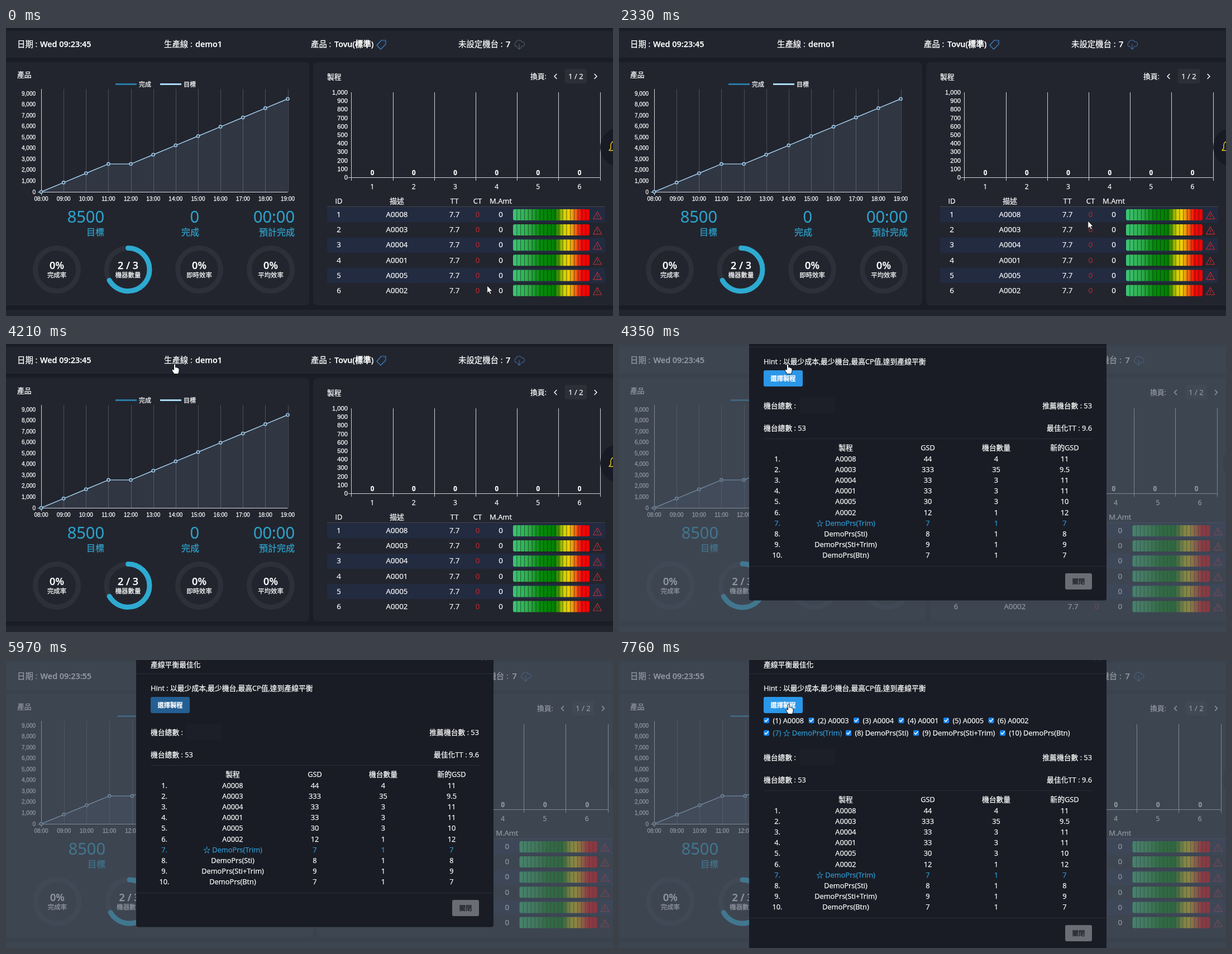
Animation, 1087 px wide and 515 px high, one loop 7990 ms. Source, as an HTML page with a canvas:

```html
<!DOCTYPE html>
<html lang="zh-Hant">
<head>
<meta charset="utf-8">
<title>Production dashboard</title>
<style>
html, body { margin: 0; width: 100%; height: 100%; overflow: hidden; background: #1a1d26; }
canvas { display: block; }
</style>
</head>
<body>
<canvas id="stage" width="1087" height="515"></canvas>
<script>
const ctx = document.getElementById('stage').getContext('2d');
const LOOP = 7990;
const UI = '"Open Sans", "Noto Sans CJK TC", "Noto Sans CJK", "Noto Sans CJK JP", sans-serif';
const ARIAL = '"Liberation Sans", sans-serif';
const BLUE = '#2fa3cc';

// Moments, in ms
const OPEN = 4350, OPENED = 4590, CLOCK = 4980, RESIZE = 5970, EXPAND = 7570, EXPANDED = 7760;

// Pointer route: time, x, y
const ROUTE = [
  [0, 862, 461], [70, 840, 455], [160, 790, 441], [240, 762, 430], [330, 762, 430],
  [700, 749, 390], [1180, 800, 319], [1400, 789, 306], [1700, 820, 291], [2020, 850, 308],
  [2330, 840, 345], [2600, 800, 440], [2750, 764, 470], [2900, 775, 466], [3200, 560, 250],
  [3400, 310, 50], [3510, 302, 32], [3780, 302, 32], [3910, 302, 36], [4590, 302, 36],
  [4900, 301, 39], [5080, 300, 42], [5300, 296, 76], [5550, 290, 60], [5830, 277, 2],
  [5970, 273, -14], [6400, 275, -14], [6750, 290, 40], [7050, 300, 70], [7300, 304, 79], [LOOP, 304, 79]
];

const clamp = v => Math.max(0, Math.min(1, v));
const easeOut = p => 1 - (1 - clamp(p)) ** 2;
let wide = false;
const fit = x => wide ? x + (x - 20) * 0.013 : x;

function text(str, x, cy, size = 13, color = '#fff', align = 'left', weight = 400, family = UI) {
  ctx.font = `${weight} ${size}px ${family}`;
  ctx.textAlign = align;
  ctx.fillStyle = ctx.strokeStyle = color;
  ctx.lineWidth = 0.25;
  ctx.fillText(str, x, cy + size * 0.36);
  ctx.strokeText(str, x, cy + size * 0.36);
}

function box(x, y, w, h, color, r = 0) {
  ctx.fillStyle = color;
  ctx.beginPath();
  ctx.roundRect(x, y, w, h, r);
  ctx.fill();
}

const hLine = (x1, x2, y, color) => box(x1, Math.round(y), x2 - x1, 1, color);
const vLine = (x, y1, y2, color) => box(Math.round(x), y1, 1, y2 - y1, color);

function stroke(path, x, y, color, width = 1.2, fill) {
  ctx.save();
  ctx.translate(x, y);
  ctx.lineWidth = width;
  ctx.lineJoin = ctx.lineCap = 'round';
  ctx.strokeStyle = color;
  const shape = new Path2D(path);
  if (fill) { ctx.fillStyle = fill; ctx.fill(shape); }
  ctx.stroke(shape);
  ctx.restore();
}

function header(t) {
  box(0, 5, 1087, 48, '#22252e');
  const item = (x, label, valueX, value) => {
    text(label, fit(x), 29, 14.4);
    text(value, fit(valueX), 29, 14.4, '#fff', 'left', 600);
  };
  item(20, '日期 :', 61, 'Wed 09:23:' + (t < CLOCK ? 45 : 55));
  item(283, '生產線 :', 339, 'demo1');
  item(546, '產品 :', 588, 'Tovu(標準)');
  item(810, '未設定機台 :', 895, '7');
  stroke('M1 10 L9 1 L17 1 L17 8 L8 17 Z M14 4 h.5', fit(663), 21, '#3d86cf');
  const cloud = t < 70 ? '#4a5966' : t > OPENED && t < RESIZE ? '#3f97c9' : '#41628f';
  stroke('M6 12 H4 A4 4 0 0 1 4 5 A6 6 0 0 1 15 4 A4 4 0 0 1 16 12 H14 M10 8 V17 M7 14 L10 17 L13 14',
    fit(909), 21, cloud, 1.3);
}

function targetChart(t) {
  const step = t < RESIZE ? 40.14 : 40.7, left = 63, base = 293;
  const shift = wide ? 3.5 : 0;
  box(196 + shift, 99, 38, 3, '#2a7ba6');
  text('完成', 238 + shift, 101, 11);
  box(276 + shift, 99, 38, 3, '#a9d9f7');
  text('目標', 318 + shift, 101, 11);

  const yOf = v => base - v * 0.01956;
  const points = Array.from({ length: 12 }, (_, i) => [left + i * step, yOf(850 * (i < 4 ? i : i - 1))]);
  for (let i = 0; i < 10; i++)
    text((i * 1000).toLocaleString('en-US'), 53, yOf(i * 1000), 10, '#fff', 'right', 400, ARIAL);
  points.forEach(([x], i) => {
    if (i) vLine(x, 109, base, '#4d5058');
    text(String(8 + i).padStart(2, '0') + ':00', x, 305, 10, '#fff', 'center', 400, ARIAL);
  });
  vLine(left, 109, 299, '#d5d8dd');
  hLine(57, left + step * 11, base, '#d5d8dd');

  ctx.beginPath();
  points.forEach(p => ctx.lineTo(...p));
  ctx.strokeStyle = '#a5d0ee';
  ctx.lineWidth = 1.4;
  ctx.stroke();
  ctx.lineTo(points[11][0], base);
  ctx.lineTo(left, base);
  ctx.fillStyle = 'rgba(165,208,238,.1)';
  ctx.fill();
  points.forEach(([x, y]) => {
    ctx.beginPath();
    ctx.arc(x, y, 2.6, 0, 7);
    ctx.fillStyle = '#34475a';
    ctx.fill();
    ctx.stroke();
  });
}

function ring(cx, value, label, share) {
  const r = wide ? 39 : 38.5, cy = 432;
  cx = fit(cx);
  ctx.lineWidth = 9;
  ctx.lineCap = 'round';
  const arc = (part, color) => {
    ctx.beginPath();
    ctx.arc(cx, cy, r, -Math.PI / 2, (part * 2 - 0.5) * Math.PI);
    ctx.strokeStyle = color;
    ctx.stroke();
  };
  arc(1, '#2d3039');
  if (share) arc(share, '#2eaad1');
  text(value, cx, 425, 18, '#fff', 'center', 600);
  text(label, cx, 442, 11.4, '#fff', 'center');
}

function productPanel(t) {
  box(-10, 61, fit(543) + 10, 435, '#22252e', 8);
  text('產品', 20, 83, 12.8);
  targetChart(t);
  [[176, '8500', '目標'], [346, '0', '完成'], [517, '00:00', '預計完成']].forEach(([x, value, label]) => {
    text(value, fit(x), 338, 29, BLUE, 'right');
    text(label, fit(x), 365, 16, BLUE, 'right');
  });
  ring(91, '0%', '完成率');
  ring(218.5, '2 / 3', '機器數量', 2 / 3);
  ring(346, '0%', '即時效率');
  ring(474, '0%', '平均效率');
}

function gauge(x, y, w) {
  const g = ctx.createLinearGradient(x, 0, x + w, 0);
  [[0, '#3cc574'], [.2, '#2fac4d'], [.36, '#068a0c'], [.55, '#008000'], [.6, '#5c9a00'], [.66, '#cfcf08'],
   [.73, '#f2d000'], [.78, '#ee9310'], [.84, '#f24a10'], [.89, '#f40808'], [1, '#f40000']]
    .forEach(s => g.addColorStop(...s));
  box(x, y, w, 20, g, 3);
  for (let i = 1; i < 20; i++) box(x + i * w / 20 - .5, y, 1, 20, 'rgba(18,28,22,.6)');
}

function processPanel(t) {
  box(fit(550), 61, 560, 435, '#22252e', 8);
  text('製程', fit(575), 87, 12.8);
  text('換頁:', fit(939), 86, 12.8);
  stroke('M4 -4 L0 0 L4 4', fit(982), 86.5, '#fff', 1.5);
  box(fit(1001), 73, 39, 26, '#2c2f38', 3);
  text('1 / 2', fit(1020.5), 86, 13, '#fff', 'center');
  stroke('M0 -4 L4 0 L0 4', fit(1054), 86.5, '#fff', 1.5);

  const left = wide ? 625.4 : 618.4, step = t < RESIZE ? 74.2 : 75.4, line = '#d0d3d8';
  for (let i = 0; i <= 10; i++) {
    const y = 267 - i * 15.2;
    text((i * 100).toLocaleString('en-US'), left - 6.5, y, 11.2, '#fff', 'right', 400, ARIAL);
  }
  hLine(left - 6, left + step * 6, 267, line);
  for (let i = 0; i <= 6; i++) {
    vLine(left + i * step, 115, 273, line);
    if (i === 6) break;
    text('0', left + (i + .5) * step + .6, 259, 11.5, '#fff', 'center', 700);
    text(i + 1, fit(656 + i * 74.2), 284, 12, '#fff', 'center');
  }

  const columns = [596, 700, 803, 844.5, 886];
  ['ID', '描述', 'TT', 'CT', 'M.Amt'].forEach((s, i) => text(s, fit(columns[i]), 309, 13, '#fff', 'center'));
  hLine(fit(575), fit(1073), 319, '#454851');
  [8, 3, 4, 1, 5, 2].forEach((code, i) => {
    const y = 333.5 + i * 27.1;
    if (i % 2 === 0) box(fit(575), y - 13, fit(1073) - fit(575), 27, '#222b40');
    [i + 1, 'A000' + code, '7.7', '0', '0'].forEach((s, c) =>
      text(s, fit(columns[c]), y, 13.3, c === 3 ? '#b5262e' : '#fff', 'center'));
    gauge(fit(908), y - 9.5, fit(1045) - fit(908));
    stroke('M0 -7 L7.5 6 H-7.5 Z M0 -2 V2 M0 4 V4.2', fit(1059), y + 2, '#c62c35', 1.1);
  });
}

function bell() {
  const x = wide ? 1116 : 1099;
  ctx.beginPath();
  ctx.arc(x, 213, 35, 0, 7);
  ctx.fillStyle = '#181b25';
  ctx.fill();
  stroke('M-9 7 H9 L6 3 V-3 A6 6 0 0 0 -6 -3 V3 Z', x - 10, 212, '#e5c61c', 1.5);
}

function checkbox(x, cy, label, color) {
  box(x, cy - 5, 10, 10, '#1583ee', 2);
  stroke('M2.2 0 L4.2 2.2 L8 -2.5', x, cy, '#fff', 1.5);
  text(label, x + 16.5, cy, 12.8, color);
}

const PROCESSES = [
  ['A0008', 44, 4, 11], ['A0003', 333, 35, 9.5], ['A0004', 33, 3, 11], ['A0001', 33, 3, 11],
  ['A0005', 30, 3, 10], ['A0002', 12, 1, 12], ['☆ DemoPrs(Trim)', 7, 1, 7], ['DemoPrs(Sti)', 8, 1, 8],
  ['DemoPrs(Sti+Trim)', 9, 1, 9], ['DemoPrs(Btn)', 7, 1, 7]
];
const rowColor = i => i === 6 ? '#319bd7' : '#fff';

function modal(t, bright) {
  const size = 12.8, rule = '#2a2d36';
  const grown = 45 * easeOut((t - EXPAND) / (EXPANDED - EXPAND));
  ctx.save();
  ctx.translate(0, Math.round(-19 * (1 - easeOut((t - OPEN) / (OPENED - OPEN)))));
  box(233, -40, 640, 517.5 + grown, '#191c24', 4);
  text('產線平衡最佳化', 259, 8, size);
  stroke('M-4 -4 L4 4 M4 -4 L-4 4', 856, -4, '#6d7077', 1.4);
  hLine(233, 873, 24, rule);
  text('Hint : ', 259, 50, size);
  text('以最少成本,最少機台,最高CP值,達到產線平衡', 294, 50, size);
  box(259, 66, 70, 29, bright ? '#2b97e8' : '#245f93', 3);
  text('選擇製程', 294, 81, 11.2, '#fff', 'center', 600);

  if (grown) {
    ctx.save();
    ctx.beginPath();
    ctx.rect(233, 96, 640, grown);
    ctx.clip();
    const starts = [259, 406, 527, 682];
    PROCESSES.forEach(([name], i) =>
      checkbox(i < 6 ? 259 + i * 80.5 : starts[i - 6], i < 6 ? 108 : 130.5, `(${i + 1}) ${name}`, rowColor(i)));
    ctx.restore();
  }

  ctx.translate(0, Math.round(grown));
  text('機台總數 :', 259, 129, size);
  box(323, 115, 64, 28, '#1c1f28', 2);
  text('推薦機台數 : 53', 847, 129, size, '#fff', 'right');
  text('機台總數 : 53', 259, 169, size);
  text('最佳化TT : 9.6', 847, 169, size, '#fff', 'right');
  hLine(259, 847, 188, rule);
  const columns = [283.5, 406, 553, 675.5, 798];
  const row = (cells, y, color) => cells.forEach((s, c) => text(s, columns[c], y, size, color, 'center'));
  row(['', '製程', 'GSD', '機台數量', '新的GSD'], 204.5, '#fff');
  PROCESSES.forEach((cells, i) => row([i + 1 + '.', ...cells], 224 + i * 19.2, rowColor(i)));
  hLine(233, 873, 416, rule);
  box(799, 429, 48, 29, '#6a6d74', 3);
  text('關閉', 823, 443.5, 11.2, '#15171d', 'center');
  ctx.restore();
}

function pointerAt(t) {
  const i = Math.max(1, ROUTE.findIndex(p => p[0] > t));
  const [t0, x0, y0] = ROUTE[i - 1], [t1, x1, y1] = ROUTE[i];
  const p = (t - t0) / (t1 - t0);
  return [x0 + (x1 - x0) * p, y0 + (y1 - y0) * p];
}

function pointer(x, y, hand) {
  if (hand)
    stroke('M-1.5 10 V1 Q0 -1.5 1.5 1 V6 Q3 4.5 4 6.5 Q5.5 5.5 6.2 7.2 Q8 6.5 8 9 V13 L6.5 17.5 H-1 L-5 11 Q-4.5 8.5 -1.5 10 Z',
      x, y, '#111', 1, '#fff');
  else
    stroke('M0 0 V13 L3 10.3 L5 15 L7.2 14 L5.2 9.5 H9 Z', x, y, '#111', .8, '#fff');
}

function draw(t) {
  wide = t >= OPEN;
  const [x, y] = pointerAt(t);
  const hover = t > OPENED && x > 259 && x < 329 && y > 67 && y < 95;
  box(0, 0, 1087, 515, '#1a1d26');
  header(t);
  productPanel(t);
  processPanel(t);
  box(0, 504, 1087, 11, '#22252e');
  bell();
  if (wide) {
    box(0, 0, 1087, 515, 'rgba(78,90,104,.62)');
    modal(t, hover || t < 4880);
  }
  pointer(x, y, hover || t > 3450 && t < OPENED);
}

function tick() {
  draw(performance.now() % LOOP);
  requestAnimationFrame(tick);
}
tick();
</script>
</body>
</html>
```
